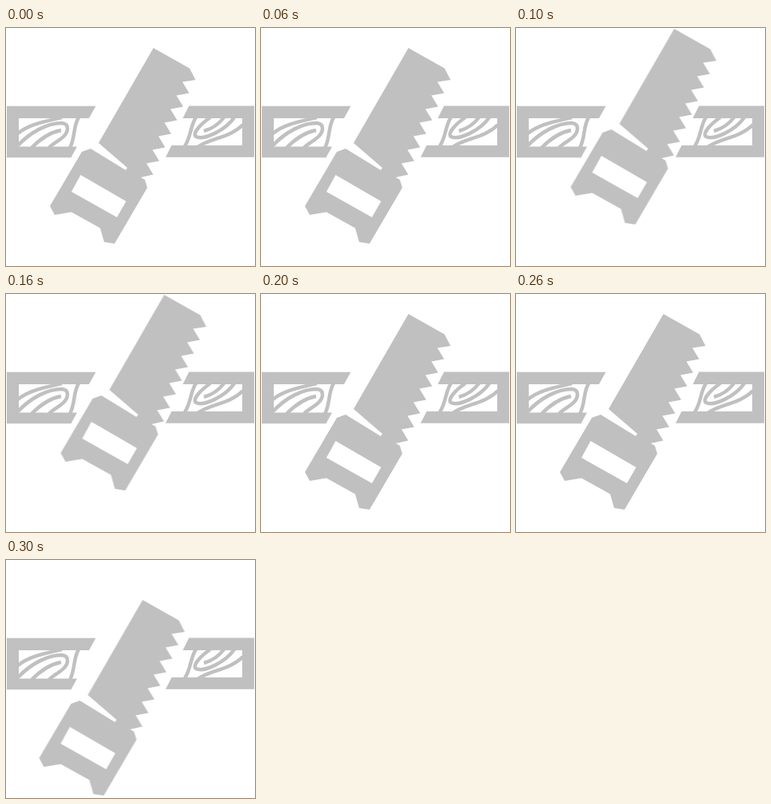
These frames come from a looping animation (312 px wide and 298 px high, 0.4 s). An HTML page without scripts:

```html
<!DOCTYPE html>
<html lang="en">
<head>
<meta charset="utf-8">
<title>Saw cutting a plank</title>
<style>
  html, body { margin: 0; width: 100%; height: 100%; overflow: hidden; background: #fff; }
  svg { display: block; width: 312px; height: 298px; }
  .solid { fill: #c0c0c0; fill-rule: evenodd; }
  .grain { fill: none; stroke: #c0c0c0; stroke-width: 4.5; }
  .saw { animation: stroke 400ms step-end infinite; }
  @keyframes stroke {
    0%, 50% { transform: translate(0, 0); }
    25% { transform: translate(13.5px, -24px); }
    75% { transform: translate(-13.5px, 25px); }
  }
</style>
</head>
<body>
<svg viewBox="0 0 312 298">
  <g class="plank-left">
    <path class="solid" d="M1 97.700H112.500L104 113H16V148.500H89L81.500 162.300H1Z"/>
    <path class="grain" d="M91 112C84 123 87 137 80 150
      M15 132C28 121 45 118 70 112
      M15 147C31 130 52 119 70 119C80 120 78 130 72 136C66 142 59 144 54 150
      M32 150C42 140 53 131 69 128"/>
  </g>
  <g class="plank-right">
    <path class="solid" d="M229.300 97.500H311V161.700H200L207.500 147H296V113H221.500Z"/>
    <path class="grain" d="M238 112C231 122 232 136 224 148
      M256 112C244 120 233 132 238 136C248 141 275 128 286 112
      M273 112C267 120 259 126 248 129
      M297 121C280 138 258 137 240 149"/>
  </g>
  <g class="saw">
    <!-- blade with eight evenly spaced teeth, then the handle -->
    <path class="solid" d="M184.700 25L230 50.500L237.500 65
      L221 67.500l8.500 14l-16 3l8.500 14l-16 3l8.500 14l-16 3l8.500 14l-16 3l8.500 14l-16 3l8.500 14l-16 3l8.500 14
      L169 187L174 190L177 200L136 270L123 268L118 250.500L82 230.500L61 234L55 223
      L95 155L106 151L150 178L152 175L116 144Z
      M93.500 184L150.500 217L139 237L82 205Z"/>
  </g>
</svg>
</body>
</html>
```
